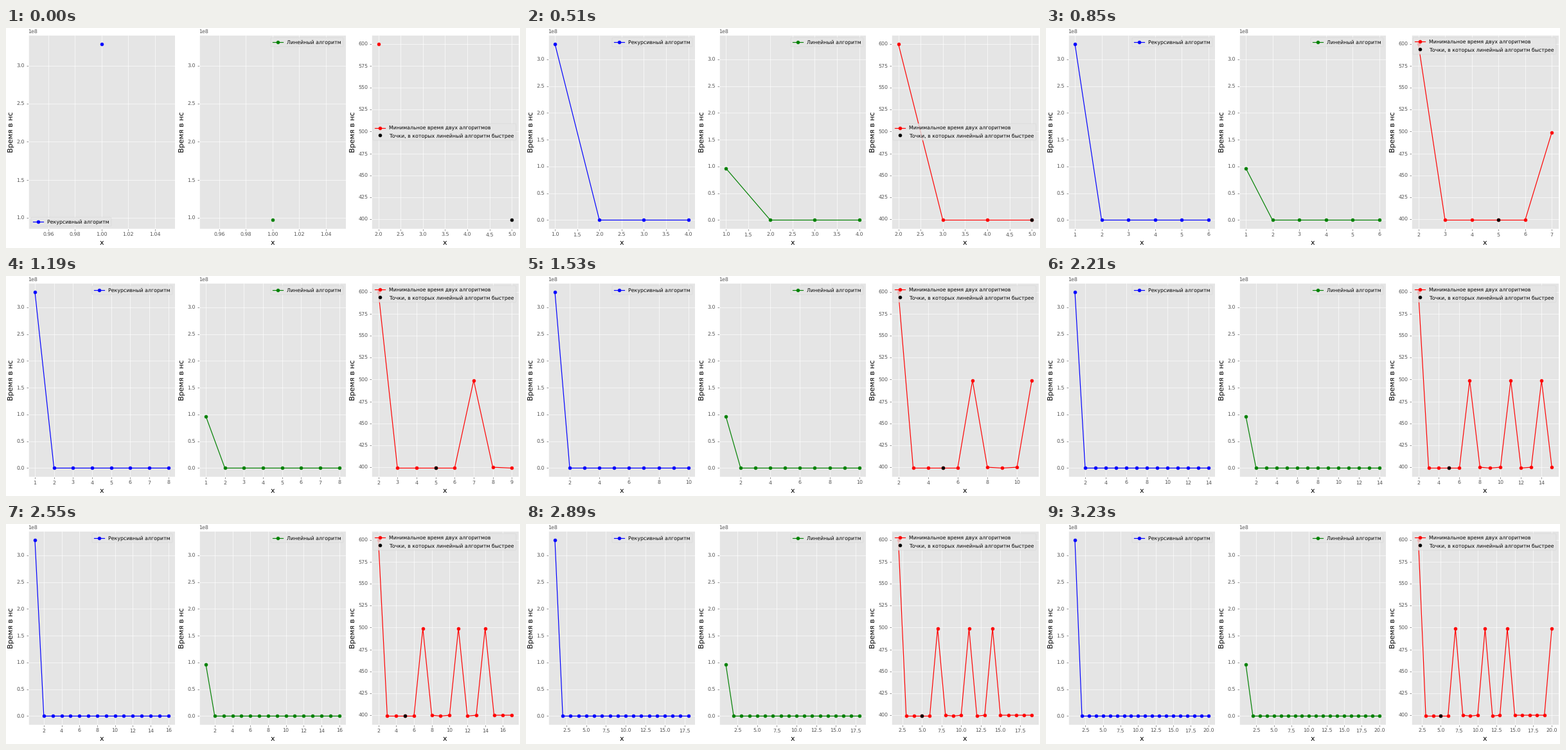
These frames come from a looping animation (800x343 px, 3580 ms). A matplotlib script:

```python
import matplotlib.pyplot as plt
from matplotlib.animation import FuncAnimation

WIDTH, HEIGHT, DPI = 800, 343, 400 / 7
LOOP_MS, TICK_MS, STEP_MS = 3580, 20, 170
LAST_STEP = 19
GRAY = "#555555"

plt.rcParams.update({
    "font.family": "DejaVu Sans",
    "font.size": 10,
    "text.hinting": "no_hinting",
    "axes.facecolor": "#E5E5E5",
    "axes.edgecolor": "white",
    "axes.linewidth": 1,
    "axes.grid": True,
    "axes.axisbelow": True,
    "axes.labelsize": 14,
    "grid.color": "white",
    "grid.linestyle": "-",
    "patch.linewidth": 0.5,
    "xtick.color": GRAY,
    "ytick.color": GRAY,
})

# Timings in ns; both algorithms are slow only on their first call.
recursive = [3.29e8] + [600] * LAST_STEP
linear = [0.968e8] + [600] * LAST_STEP
FASTER_X, FASTER_Y = 5, 399
PEAKS = {2: 600, 7: 499, 11: 499, 14: 499, 20: 499}
DIPS = {3, 4, 5, 6, 9, 12}
best_x = list(range(2, 21))
best = [PEAKS.get(x, 399 if x in DIPS else 400) for x in best_x]

fig = plt.figure(figsize=(14, 6.0025), dpi=DPI, facecolor="white")


def add_panel(left, color, label):
    top, bottom, width = 11.0, 313.2, 228.5
    ax = fig.add_axes([left / WIDTH, 1 - bottom / HEIGHT,
                       width / WIDTH, (bottom - top) / HEIGHT])
    ax.set_xlabel("x")
    ax.set_ylabel("Время в нс")
    line, = ax.plot([], [], color=color, marker="o", label=label)
    return ax, line


def padded(low, high):
    margin = 0.05 * (high - low)
    return low - margin, high + margin


rec_ax, rec_line = add_panel(34.6, "blue", "Рекурсивный алгоритм")
lin_ax, lin_line = add_panel(300.6, "green", "Линейный алгоритм")
best_ax, best_line = add_panel(569.15, "red", "Минимальное время двух алгоритмов")
best_ax.plot([FASTER_X], [FASTER_Y], "ko",
             label="Точки, в которых линейный алгоритм быстрее")
best_ax.set_ylim(padded(FASTER_Y, 600))

rec_legend = rec_ax.legend(loc="upper right")
lin_ax.legend(loc="upper right")
best_legend = best_ax.legend(loc="upper right")


def update(frame):
    step = min(int((frame + 0.5) * TICK_MS / STEP_MS), LAST_STEP)
    count = step + 1
    xs = range(1, count + 1)
    x_limits = padded(1, count) if step else padded(0.95, 1.05)
    y_limits = padded(min(linear[:count]), recursive[0])
    for ax, line, times in ((rec_ax, rec_line, recursive),
                            (lin_ax, lin_line, linear)):
        line.set_data(xs, times[:count])
        ax.set_xlim(x_limits)
        ax.set_ylim(y_limits)

    best_line.set_data(best_x[:count], best[:count])
    best_ax.set_xlim(padded(2, min(max(FASTER_X, step + 2), best_x[-1])))

    # Legends sit where they hide the fewest points.
    rec_legend.set_loc("upper right" if step else "lower left")
    best_legend.set_loc("upper right" if step >= 5 else "center right")
    return rec_line, lin_line, best_line


anim = FuncAnimation(fig, update, frames=LOOP_MS // TICK_MS,
                     interval=TICK_MS, repeat=True, repeat_delay=0)
plt.show()
```
